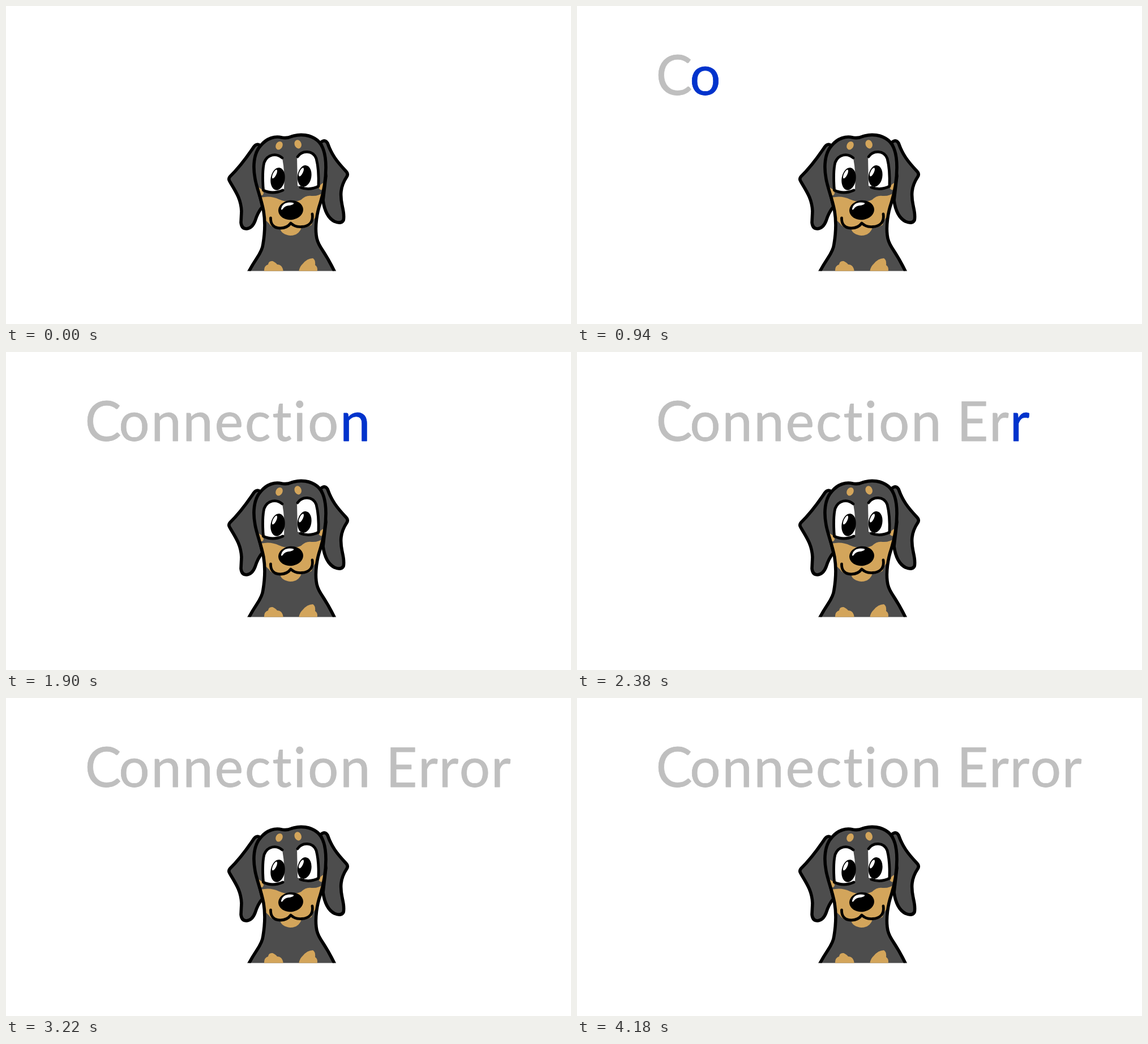
Recreate the animation shown at these times as an HTML page. Size 998 px wide and 561 px high, loop 4300 ms.

```html
<!DOCTYPE html>
<html lang="en">
<head>
<meta charset="utf-8">
<title>Connection Error</title>
<style>
  html, body { margin: 0; width: 100%; height: 100%; overflow: hidden; background: #fff; }
  svg { display: block; width: 100vw; height: 100vh; }
  text { font: 96px Lato, "Open Sans", sans-serif; font-kerning: none; letter-spacing: 1.5px; }
  tspan { visibility: hidden; stroke-width: .8; stroke-linejoin: round; }
  tspan.typed { visibility: visible; fill: #bfbfbf; stroke: #bfbfbf; }
  tspan.active { visibility: visible; fill: #0033cc; stroke: #0033cc; }
  .long { letter-spacing: 2.6px; }
  .long tspan:first-child { letter-spacing: -4.5px; }
  .coat { fill: #4d4d4d; }
  .tan { fill: #d3a55b; }
  .line { stroke: #000; stroke-width: 5.6; stroke-linecap: round; stroke-linejoin: round; }
  .thin { stroke-width: 4.8; }
  .open { fill: none; }
</style>
</head>
<body>
<svg viewBox="0 0 998 561">
  <defs>
    <clipPath id="bust"><rect x="377" y="210" width="260" height="257.5"/></clipPath>
    <path id="body" d="M426 474 Q433 460 443 445 Q453 430 454 420 C457 402 458 380 455 362
      C451 340 443 322 440 305 C436 284 437 260 450 246 C461 233 475 229 487 232 Q496 234 505 230
      C520 225 538 227 550 237 C561 246 565 264 565 285 C565 310 560 332 555 348
      C549 365 546 388 548 404 Q549 415 556 426 Q572 450 583 474 Z"/>
    <clipPath id="inside"><use href="#body"/></clipPath>
  </defs>

  <text class="long" x="139.5" y="156.6">Connection</text>
  <text x="671" y="156.6">Error</text>

  <g clip-path="url(#bust)">
    <g class="coat line">
      <path d="M450 247 Q444 241 438 248 C424 269 413 284 395.5 301 Q392 305 395.5 310
        C407 329 415 341 416 362 L415 382 Q416 393 425 393 Q435 392 440 379
        C444 366 448 360 453 354 L440 300 Z"/>
      <path d="M556 241 Q563 234 568 242 C575 262 584 274 601 292 Q605 296 602 301
        C590 319 590 334 594 353 Q598 370 596 378 Q592 385 580 380
        C567 373 562 357 560 343 L565 300 Z"/>
    </g>

    <use href="#body" class="coat"/>

    <g class="tan" clip-path="url(#inside)">
      <path d="M445 339 Q466 333 482 341 Q503 350 521 342 Q530 333 540 335 Q552 336 562 328
        L560 362 Q542 373 540 386 Q531 392 522 391 Q517 405 502 405 Q487 403 484 393
        Q470 393 464 383 L450 370 Z"/>
      <path d="M440 318 Q455 322 455 331 Q453 336 445 334 Z"/>
      <path d="M567 310 Q553 313 553 322 Q555 326 566 324 Z"/>
      <path d="M456 470 Q455 458 463 456 Q464 449 471 450 Q477 453 479 456 Q489 456 490 470 Z"/>
      <path d="M517 470 Q518 460 524 455 Q532 445 542 445 Q547 448 546 457 Q552 461 549 470 Z"/>
      <ellipse cx="482.5" cy="246.3" rx="5.9" ry="7.6" transform="rotate(28 482.5 246.3)"/>
      <ellipse cx="515.7" cy="243.8" rx="6" ry="7.8" transform="rotate(-18 515.7 243.8)"/>
    </g>
    <use href="#body" class="line open"/>

    <path fill="#fff" d="M488 268 C478 260 463 262 457 276 Q452 295 457 326 Q474 332 491 323 Q493 295 488 268"/>
    <path fill="#fff" d="M514 266 C522 254 541 254 547 269 Q553 290 550 318 Q534 325 515 317 Z"/>
    <g class="line thin open">
      <path d="M488 268 C478 259 462 261 456 276 Q452 292 454.5 325 Q471 333 489 325"/>
      <path d="M515 266 C523 254 542 254 548 269 Q553 288 552 318 Q536 326 520 320"/>
    </g>
    <ellipse cx="480" cy="305" rx="12.5" ry="20" transform="rotate(9 480 305)"/>
    <ellipse cx="527.2" cy="300" rx="12.2" ry="19" transform="rotate(9 527.2 300)"/>
    <g fill="#fff">
      <ellipse cx="474.5" cy="296.5" rx="3" ry="8.5" transform="rotate(26 474.5 296.5)"/>
      <ellipse cx="521.5" cy="293" rx="3" ry="8.3" transform="rotate(26 521.5 293)"/>
    </g>

    <g id="scowl" visibility="hidden">
      <path class="coat" d="M449 298 L448 268 Q465 252 493 260 L493 294 Q472 301 449 298
        M511 291 L511 260 Q530 247 552 260 L557 288 Q534 298 511 291"/>
      <g class="line thin open">
        <path d="M450 296.5 Q470 300 484 296 Q494 294 492.5 282"/>
        <path d="M513 282 Q510 292 520 293 Q540 295 556 288"/>
      </g>
    </g>

    <ellipse cx="503" cy="360" rx="22" ry="17.2" transform="rotate(-5 503 360)"/>
    <path fill="#fff" d="M486 358 Q488 347 501 346.5 Q510 346.5 508 349 Q505 351.5 499 352 Q492 353 489 358 Q486 361 486 358"/>
    <path class="line thin open" d="M467.5 374 C467 386 474 392 485 392 Q497 391.5 503 383
      Q510 390 522 389.5 C536 389 543 381 541 367"/>
  </g>
</svg>
<script>
  const LOOP = 4300, STEP = 120, TYPING_START = 820;
  const SCOWL = [2740, 3220];
  const scowl = document.getElementById('scowl');
  const glyphs = [];

  // The space between the words takes one typing step of its own.
  let slot = 0;
  for (const word of document.querySelectorAll('text')) {
    const letters = [...word.textContent];
    word.textContent = '';
    for (const letter of letters) {
      const node = document.createElementNS('http://www.w3.org/2000/svg', 'tspan');
      node.textContent = letter;
      word.append(node);
      glyphs.push({ node, slot: slot++ });
    }
    slot++;
  }

  function draw() {
    const t = performance.now() % LOOP;
    const current = Math.floor((t - TYPING_START) / STEP);
    for (const { node, slot } of glyphs) {
      const state = slot < current ? 'typed' : slot === current ? 'active' : '';
      node.setAttribute('class', state);
    }
    const scowling = t >= SCOWL[0] && t < SCOWL[1];
    scowl.setAttribute('visibility', scowling ? 'visible' : 'hidden');
    requestAnimationFrame(draw);
  }
  draw();
</script>
</body>
</html>
```
